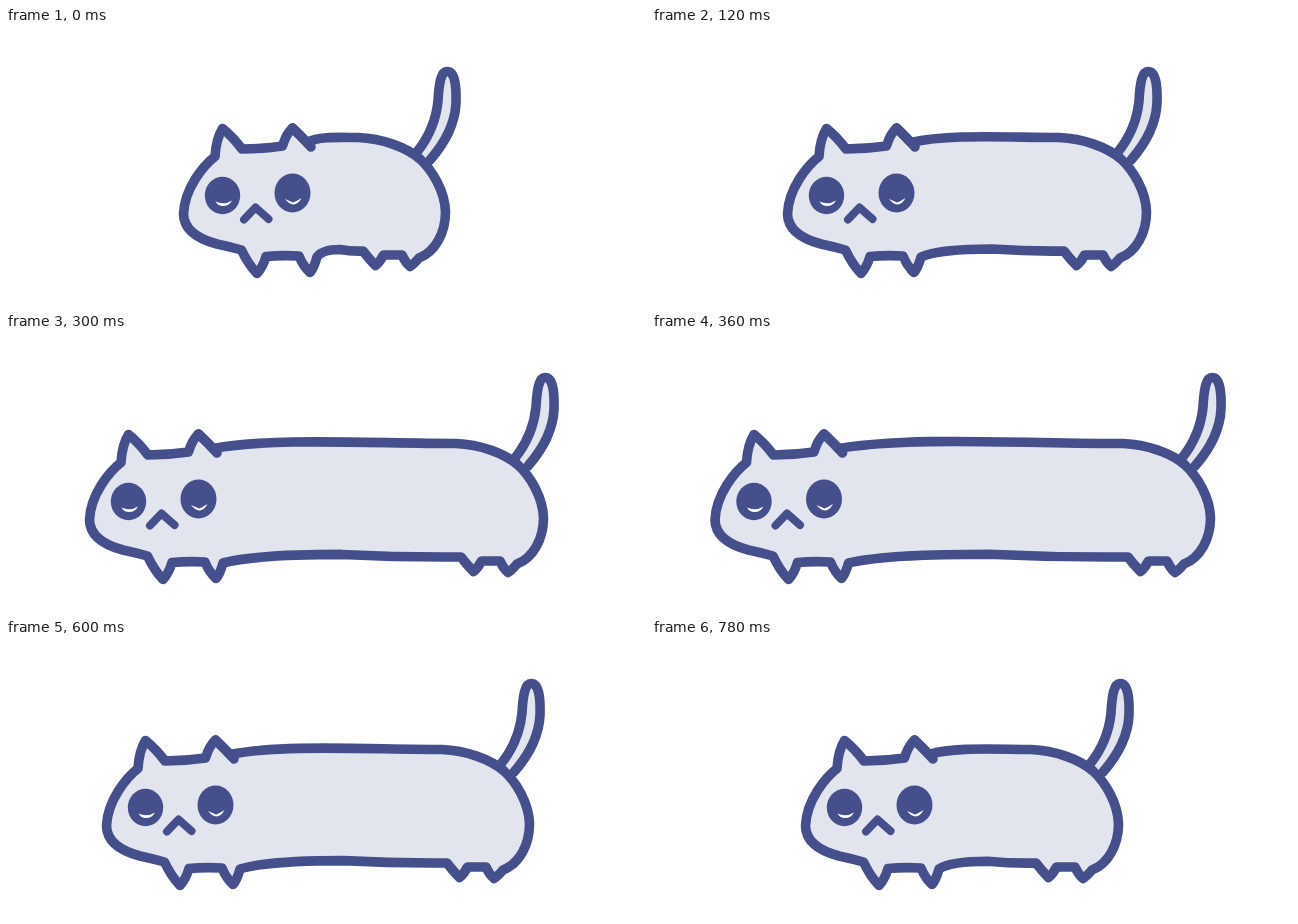
Animation of 640 by 278 pixels, one loop 840 ms. Source, as an HTML page:

```html
<!DOCTYPE html>
<html lang="en">
<head>
<meta charset="utf-8">
<title>Stretching cat</title>
<style>
  html, body { margin: 0; width: 100%; height: 100%; overflow: hidden; background: #fff; }
  svg { display: block; width: 100%; height: 100%; }
  .line { fill: none; stroke: #454f8b; stroke-width: 9.6; stroke-linecap: round; stroke-linejoin: round; }
  .skin { fill: #e2e5ed; }
  .eye { fill: #454f8b; }
  .glint { fill: #fff; }
</style>
</head>
<body>
<svg viewBox="0 0 640 278">
  <path id="tail" class="line skin"
    d="M411,124 C423,109 430,93 432,73 C433,55 435,43.5 441,43.5 C449,43.5 450.5,58 450,75 C449,97 438,116 424,132"/>
  <path id="body" class="line skin"/>
  <g id="face">
    <path class="line" d="M286.5,100 Q296,109 305,119"/>
    <ellipse class="eye" cx="216.5" cy="167.5" rx="17.7" ry="18.7"/>
    <ellipse class="eye" cx="286.5" cy="165" rx="18" ry="19.5"/>
    <path class="glint" d="M209.5,173.5 Q218,177.5 226,172.5 Q223,178 217,178 Q212,178 209.5,173.5Z"/>
    <path class="glint" d="M279,171 Q283,172.5 287,174.5 Q291,173 295.5,170 Q292,176.5 287.5,176.5 Q283,176 279,171Z"/>
    <path class="line" style="stroke-width:8" d="M238,191.5 L249.5,179.5 L262.5,191"/>
  </g>
</svg>
<script>
const STEP = 60, COUNT = 14;
const headX = [0, -24, -42, -59, -77, -94, -114.5, -132];
const tailX = [0, 27, 55, 70, 84, 98, 119, 135];

const front = "M301,114.5 Q294,107 286.5,100 Q280,106 276.5,118 Q256,121 236,121 Q227,109 216.5,100.5 " +
  "Q210,111 209,128.5 C198,137 178.5,160 177.5,186 C178,204 196,212 211,216 Q225,219 235.5,222 " +
  "Q242,236 251,245.5 Q257,239 260,228.5 Q276,227 293,228 Q297,238 304,244.5 Q308,240 311,229 ";
const rear = "357,223 Q363,231 369.5,237.5 Q374,234 377.5,227 L396,227 Q399,234 404,238.5 " +
  "Q408,236 413,230 C429,224 439.5,205 439.5,184 C439,163 426,142 414,131 C400,119 376,110.5 352,109.5 ";

const $ = id => document.getElementById(id);
const shift = (path, dx) => path.replace(/([\d.]+),/g, (_, x) => +x + dx + ",");
const mix = (a, b, k) => a + (b - a) * k;

function outline(h, t) {
  const k = (t - h) / 267;
  const belly = u => mix(311 + h, 357 + t, u);
  const back = u => mix(301 + h, 352 + t, u);
  const midY = mix(221.5, 220, k);
  return shift(front, h) +
    `C${belly(.1)},222.5 ${belly(.3)},${midY} ${belly(.5)},${midY} Q${belly(.75)},223.5 ` +
    shift(rear, t) +
    `C${back(.65)},109.5 ${back(.25)},${mix(108, 101.5, k)} ${back(0)},114.5Z`;
}

function draw(ms) {
  const n = Math.floor(ms / STEP) % COUNT;
  const i = Math.min(n, COUNT - n);
  const h = headX[i], t = tailX[i];
  $("body").setAttribute("d", outline(h, t));
  $("face").setAttribute("transform", `translate(${h})`);
  $("tail").setAttribute("transform", `translate(${t})`);
}

const start = performance.now();
function tick() {
  draw(performance.now() - start);
  requestAnimationFrame(tick);
}
tick();
</script>
</body>
</html>
```
